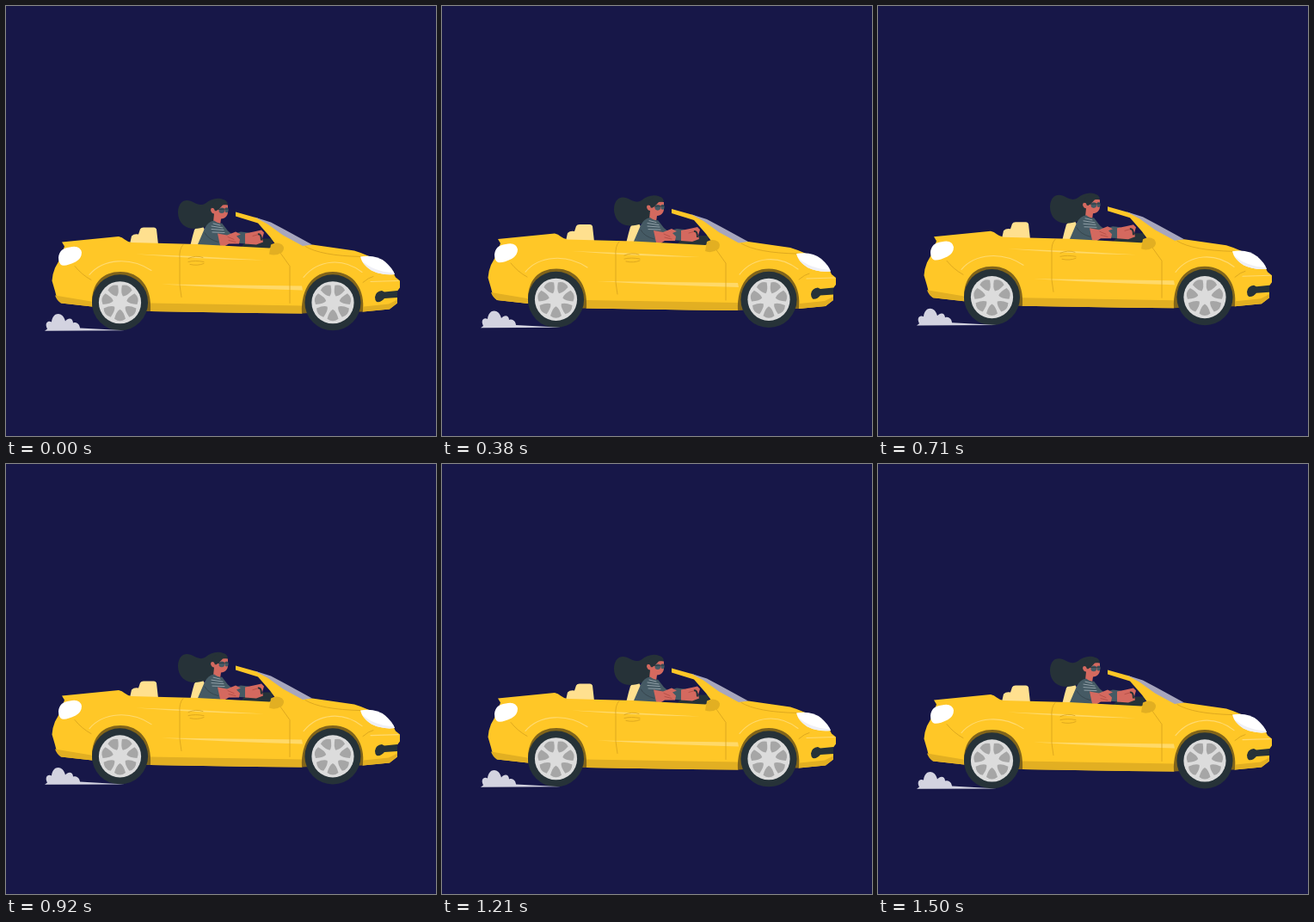
Write an HTML page that moves like this. It is 500 px wide and 500 px high and loops after 1540 ms.

```html
<!DOCTYPE html>
<html lang="en">
<head>
<meta charset="utf-8">
<title>Convertible</title>
<style>
  html, body { margin: 0; width: 100%; height: 100%; overflow: hidden; background: #171748; }
  svg { display: block; width: 100vw; height: 100vh; }
  .body { fill: #ffc727; }
  .shade { fill: #e2af22; }
  .arch { fill: #82651a; }
  .dark { fill: #263238; }
  .cloth { fill: #455a64; }
  .skin { fill: #d4695f; }
  .seat { fill: #ffe08f; }
  .glow { fill: #ffd968; }
  .lamp { fill: #fff; }
  .seam, .shine, .stripe, .crease { fill: none; stroke-linecap: round; stroke-linejoin: round; }
  .seam { stroke: #d6a11d; stroke-width: .8; }
  .shine { stroke: #ffda70; stroke-width: 1.1; }
  .stripe { stroke: #b0bec5; stroke-width: .7; }
  .crease { stroke: #a94740; stroke-width: .7; }
</style>
</head>
<body>
<svg viewBox="0 0 500 500">
  <defs>
    <g id="wheel">
      <circle class="dark" r="32.6"/>
      <circle r="24.6" fill="#dcdcdc"/>
      <g id="gaps" fill="#a6a6a6"/>
    </g>
  </defs>
  <g id="car">
    <!-- seats and dashboard -->
    <path class="seat" d="M144 276L146 267Q149 264 154 265L156 259Q157 257 160 257H172Q174 257 175 259L177 277Z"/>
    <path class="seat" d="M214 279L217 267L219 260Q222 255 229 256L233 263V279Z"/>
    <path class="dark" d="M272 282L278 274L300 270L309 270L312 283Z"/>

    <!-- driver -->
    <path class="dark" d="M242 248C234 259 215 262 206 254C198 247 198 231 206 226.500C216 222 222 235 232 229C240 222 252 221 257 228C258 234 254 236 249 236L243 240Z"/>
    <path class="skin" d="M242 235Q238 233 238 237Q239 241 242 241L241 251L249 254L250 247C255 247 258 243 258 239V231L249 230Q245 236 243 238Z"/>
    <path class="dark" d="M240 234Q240 226 249 224Q257 224 258 230L252 231Q248 236 244 238L242 235Z"/>
    <circle class="cloth" cx="250.800" cy="237.300" r="3.300"/>
    <ellipse class="cloth" cx="256.500" cy="236.800" rx="2.100" ry="3"/>
    <path d="M244 236L258 235.500" stroke="#263238" stroke-width=".8"/>
    <path class="cloth" d="M222 279L231 258Q235 250 242 249Q248 253 251 252L258 261L264 266L251 279Z"/>
    <path class="stripe" d="M241 252.500L249 254.500M239 255.500L252 257.500M239 259L253 260M240 262.500L254 263"/>
    <path d="M231 263Q235 271 247 274" fill="none" stroke="#37474f" stroke-width="1"/>
    <path class="cloth" d="M263 265L273 262L282 263L281 276L264 275Z"/>
    <path class="skin" d="M246 264L257 266L267 262L273 265L268 267L272 271L271 276L259 276L254 279L249 278Z"/>
    <path class="skin" d="M278 264L288 262L297 260L300 263L298 270L299 274L291 277L278 276Z"/>
    <path class="crease" d="M258 268L265 271M259 272L267 274M287 267L294 265"/>
    <path d="M293 265Q297 264 297 272" fill="none" stroke="#263238" stroke-width="2"/>

    <!-- bodywork -->
    <path class="body" d="M65 274L131 267.500Q135 268 138 271Q141 273.500 146 274.500L222 276.500L306 281L315 279
      L307 268L293 252L267 244V239L292 246L314 256L347 277L356 277L405 284Q422 289 440 300Q451 309 453 315L458 319V327L455 331
      L455 345L446 352L415 355L380 340L344 357L290 356.500L168 354.500L133 340L100 349L64 345Q59 341 57 331L53.500 319
      Q54 311 57 304L62 295L68 279Z"/>
    <path d="M289 245L308 251L324 259.500L356 277L345 278.500L322 266L304 253Z" fill="#a7a6bd"/>
    <path class="shade" d="M168 345L344 348V357L290 356.500L168 354.500ZM57 336L99 343L100 349L64 345Q59 342 57 336ZM416 349L445 346L455 341V345L446 352L415 355Z"/>
    <path class="arch" d="M100 349V344C100 322 112 308.500 133 308.500C156 308.500 170 327 168 354.500H140ZM344 357C343 327 357 308.500 380 308.500C405 308.500 418 330 415 355H380Z"/>

    <!-- reflections and seams -->
    <path class="glow" d="M151 288Q225 290 300 295Q225 294 151 288ZM181 323L344 325L345 330Q265 328 181 323Z"/>
    <path class="shine" d="M97 312C113 293 145 291 169 307M346 315C363 294 392 292 414 309M424 320L456 319"/>
    <path class="seam" d="M206 277Q201 282 202 294V324L204 338M315 281L330 302V345M80 302Q88 312 99 318M348 279Q366 290 413 291M415 321Q422 315 427 314"/>
    <path class="seam" d="M212 293Q221 289 229 292M212 297Q220 295 230 297M214 300Q223 302 230 299"/>
    <path class="shade" d="M308 277Q315 273 321 277Q325 281 321 286Q313 291 306 288Z"/>

    <!-- lights and grille -->
    <path class="lamp" d="M61 292Q62 281 74 280Q86 277 88 286Q88 293 81 297Q71 302 65 301Q61 299 61 292Z"/>
    <path class="lamp" d="M412 291Q430 288 441 297Q450 305 452 311.500Q437 313 425 307Q414 300 412 291Z"/>
    <path d="M414 296Q427 308 451 310L452 311.500Q437 313 425 307Q417 302 414 296Z" fill="#efeff5"/>
    <path class="dark" d="M429 338Q430 331 437 330.500L440 332L455 330.500V338.500L440 339.500Q436 344.500 431 343.500Q429 342 429 338Z"/>

    <use href="#wheel" x="132.500" y="344.300"/>
    <use href="#wheel" x="380" y="344.300"/>
    <path d="M45 377.200L48 375C44 367 50 365 53 367C54 355 66 354 69 366C73 361 78 363 78 368C83 366 86 371 86 374L138 376.800Z" fill="#d3d3e0"/>
  </g>
</svg>
<script>
  const LOOP = 1540, STEPS = 37, BASE = .6, RISE = 6.3, LEAD = 50;
  const car = document.getElementById('car');

  document.getElementById('gaps').innerHTML = Array.from({ length: 7 }, (_, i) =>
    `<path transform="rotate(${i * 360 / 7})" d="M0 8Q4 10 6.500 19Q0 24 -6.500 19Q-4 10 0 8Z"/>`).join('');

  // Softened triangle wave: 0 at the lowest point, 1 at the highest.
  function lift(ms) {
    const s = -Math.cos(2 * Math.PI * (ms + LEAD) / LOOP);
    return .5 + .5 * Math.asin(.93 * s) / Math.asin(.93);
  }

  const start = performance.now();
  function draw(now) {
    const t = Math.max(0, now - start) % LOOP;
    const ms = Math.floor(t / LOOP * STEPS + .1) * LOOP / STEPS;
    car.setAttribute('transform', `translate(0 ${(BASE - RISE * lift(ms)).toFixed(2)})`);
    requestAnimationFrame(draw);
  }
  draw(start);
</script>
</body>
</html>
```
